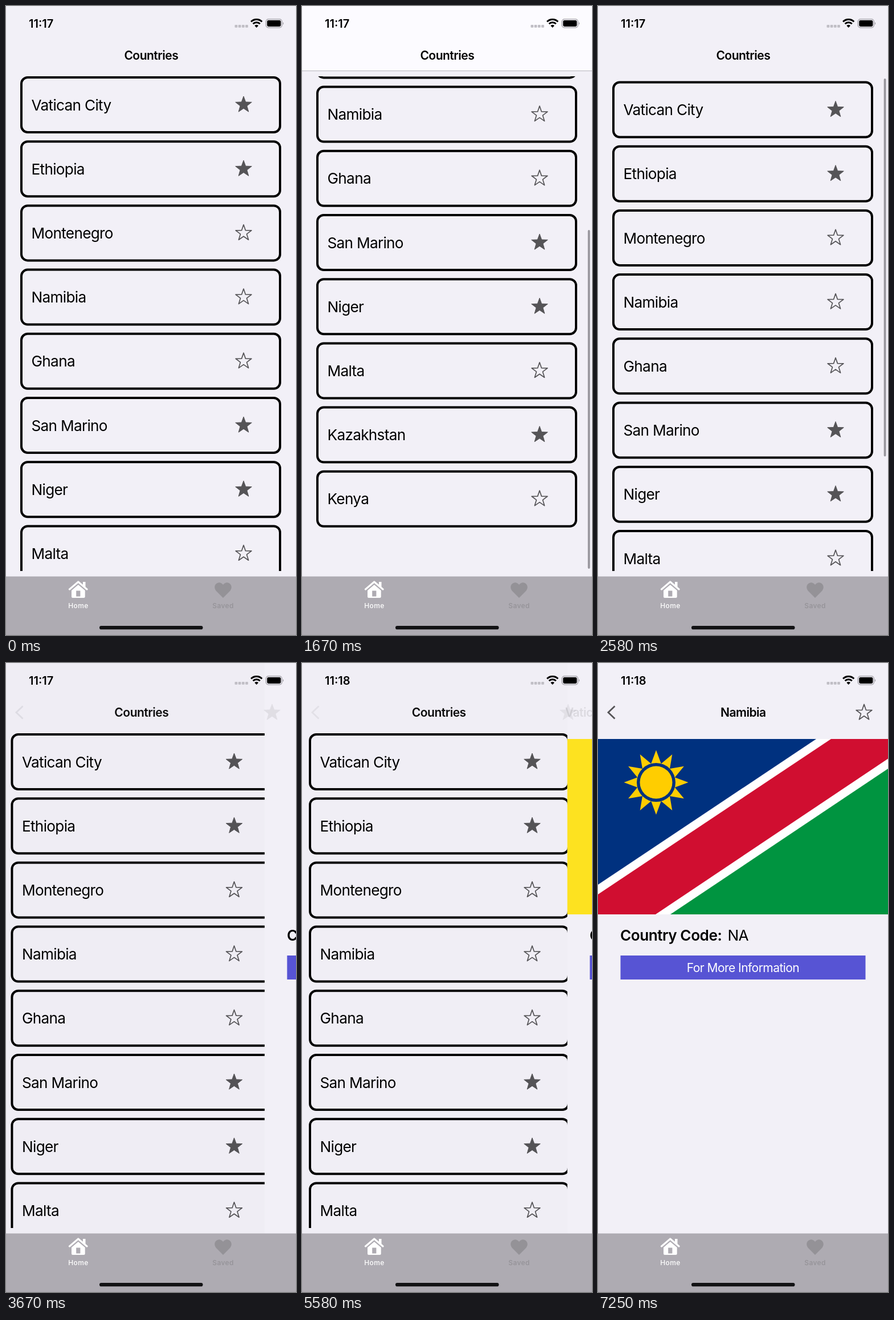
These frames come from a looping animation (509 by 1101 pixels, 8000 ms). An HTML page:

```html
<!DOCTYPE html>
<html lang="en">
<head>
<meta charset="utf-8">
<title>Countries</title>
<style>
  html, body { margin: 0; width: 100%; height: 100%; overflow: hidden; background: #f2f0f7; }
  svg { display: block; width: 100%; height: 100%; font-family: Inter, "Liberation Sans", sans-serif; }
  .label { font-size: 26.2px; letter-spacing: -.7px; }
  .strong { font-size: 26.2px; letter-spacing: -.5px; font-weight: 600; }
  .title { font-size: 21px; letter-spacing: -.5px; font-weight: 600; text-anchor: middle; }
  .button { font-size: 21px; letter-spacing: -.55px; text-anchor: middle; fill: #fff; }
  .clock { font-size: 20px; font-weight: 600; }
  .tab { font-size: 12px; letter-spacing: .4px; font-weight: 500; text-anchor: middle; }
  .emblem { stroke: #55503c; stroke-width: 1; }
</style>
</head>
<body>
<svg id="stage" viewBox="0 0 509 1101"></svg>
<script>
const WIDTH = 509, FPS = 12, LOOP = 8000;
const BG = '#f2f0f7', GREY = '#555457', YELLOW = '#fde220', SILVER = '#d3d3d5', RED = '#ee3135';
const MAX_SCROLL = 243, BAR_TOP = 127, BAR_BOTTOM = 985, BAR_LENGTH = 670;

const countries = ['Vatican City', 'Ethiopia', 'Montenegro', 'Namibia', 'Ghana',
  'San Marino', 'Niger', 'Malta', 'Kazakhstan', 'Kenya'];
const saved = new Set(['Vatican City', 'Ethiopia', 'San Marino', 'Niger', 'Kazakhstan']);

const clamp = v => Math.max(0, Math.min(1, v));

function starPoints(cx, cy, spikes, outer, inner) {
  return Array.from({ length: spikes * 2 }, (_, i) => {
    const r = i % 2 ? inner : outer, a = i * Math.PI / spikes;
    return `${(cx + r * Math.sin(a)).toFixed(2)},${(cy - r * Math.cos(a)).toFixed(2)}`;
  }).join(' ');
}

function star(cx, cy, filled) {
  return filled
    ? `<polygon points="${starPoints(cx, cy, 5, 15, 6.2)}" fill="${GREY}" stroke="${GREY}" stroke-linejoin="round"/>`
    : `<polygon points="${starPoints(cx, cy, 5, 14.6, 5.8)}" fill="none" stroke="${GREY}" stroke-width="1.7" stroke-linejoin="round"/>`;
}

const circle = (x, y, r, fill) => `<circle cx="${x}" cy="${y}" r="${r}" fill="${fill}"/>`;

function card(name, i) {
  return `<g transform="translate(0 ${i * 112.2})">
    <rect x="27" y="125" width="454" height="96" rx="11" fill="none" stroke="#000" stroke-width="4"/>
    <text class="label" x="44.5" y="182.7">${name}</text>
    ${star(417, 173, saved.has(name))}</g>`;
}

// Key with its bow at the lower left; mirrored for the second one.
function key(color) {
  const holes = [[-68, 325], [-52, 325], [-68, 341], [-52, 341]];
  return `<path d="M-44 320L70 222" stroke="#55503c" stroke-width="12"/>
    <path d="M-44 320L70 222" stroke="${color}" stroke-width="10"/>
    <path d="M44 246L63 229L72 237L79 230L86 238L85 248L76 254L70 248L65 254L70 260L62 270L47 257Z" fill="${color}"/>
    <path d="M64 224L74 213L81 211L82 218L71 231Z" fill="${color}"/>
    <path d="M-39 304L-30 297L-22 306L-32 315Z" fill="${color}"/>
    ${circle(-60, 333, 26.5, color)}${circle(-60, 333, 21, '#fff')}
    <path d="M-60 312V354M-81 333H-39" stroke="#55503c" stroke-width="6"/>
    <path d="M-60 312V354M-81 333H-39" stroke="${color}" stroke-width="4.5"/>
    ${holes.map(([x, y]) => circle(x, y, 9, '#fff')).join('')}
    ${circle(-60, 333, 3.5, color)}
    ${circle(83, 208, 3.5, YELLOW)}${circle(-82, 312, 3.5, YELLOW)}${circle(-82, 354, 3.5, YELLOW)}`;
}

function lappets() {
  const side = `
    <path d="M-26 216C-38 222-46 236-45 262L-32 266C-36 248-30 238-20 234Z" fill="#fff"/>
    <path d="M-18 235C-22 250-20 262-23 272L-11 276C-7 262-6 250-6 238Z" fill="#fff"/>
    <path d="M-29 218C-38 206-48 208-52 217L-61 209C-56 200-42 198-27 203Z" fill="${YELLOW}"/>
    <path d="M-39 239V252M-44 244H-34M-14 243V257M-18 248H-10" stroke="${YELLOW}" stroke-width="4"/>`;
  return side + `<g transform="scale(-1 1)">${side}</g>`;
}

function tiara() {
  const tiers = [[208, 27, 23], [187, 30, 21], [167, 22, 17]];
  return `<path d="M-17 170C-16 150 16 150 17 170Z" fill="#fff"/>
    <path d="M-24 190L-17 168H17L24 190L26 212L19 229H-19L-26 212Z" fill="${YELLOW}"/>` +
    tiers.map(([y, top, base]) =>
      `<path d="M${-top} ${y - 7}L${-top + 7} ${y - 2}L-8 ${y - 9}L0 ${y - 2}L8 ${y - 9}L${top - 7} ${y - 2}L${top} ${y - 7}L${base} ${y + 8}Q0 ${y + 14} ${-base} ${y + 8}Z" fill="${YELLOW}"/>
       <path d="M${-base} ${y + 3}Q0 ${y + 9} ${base} ${y + 3}" fill="none"/>
       ${[-14, 0, 14].map(x => circle(x, y + 2, 2.2, '#fff')).join('')}`).join('') +
    `<ellipse cx="0" cy="229" rx="19.5" ry="6" fill="${RED}"/>
     ${circle(0, 153, 3, YELLOW)}
     <path d="M0 150V139M-5 144H5" stroke="${YELLOW}" stroke-width="3"/>`;
}

function cord() {
  const beads = [[0, 274], [2, 280], [-12, 283], [11, 286], [-6, 288], [4, 289], [-12, 291], [0, 294],
    [6, 297], [-8, 300], [-10, 307], [-12, 313], [-15, 320], [2, 324], [3, 328], [-44, 344], [-37, 343],
    [-35, 350], [-30, 355], [30, 337], [35, 341], [43, 343], [43, 352], [32, 356], [17, 358], [10, 360], [2, 361]];
  const tassel = (x, y) => `<path d="M${x - 6} ${y + 20}V${y + 10}Q${x} ${y} ${x + 6} ${y + 10}V${y + 20}Q${x} ${y + 24} ${x - 6} ${y + 20}Z" fill="${RED}"/>
    ${circle(x, y + 2, 3, YELLOW)}${circle(x, y - 4, 2.5, YELLOW)}`;
  return beads.map(([x, y]) => `<ellipse cx="${x}" cy="${y}" rx="2.8" ry="2" fill="${RED}"/>`).join('') +
    tassel(4, 386) + tassel(-3, 391);
}

const vaticanFlag = `<rect y="133" width="254.5" height="307" fill="${YELLOW}"/>
  <rect x="254.5" y="133" width="254.5" height="307" fill="#fdfcff"/>
  <g class="emblem" transform="translate(378 0)">${lappets()}
    <g transform="scale(-1 1)">${key(SILVER)}</g>${key(YELLOW)}${tiara()}${cord()}</g>`;

const namibiaFlag = `<rect y="133" width="509" height="307" fill="#00317f"/>
  <path d="M127 440H509V133Z" fill="#009440"/>
  <path d="M509 185V440H127Z" fill="#009440"/>
  <path d="M383 133H509V185L127 440H0V388Z" fill="#fff"/>
  <path d="M409 133H509V167.500L101 440H0V405Z" fill="#d00e30"/>
  <polygon points="${starPoints(102, 209, 12, 56.5, 34)}" fill="#ffcd00"/>
  ${circle(102, 209, 34, '#00317f')}${circle(102, 209, 28.5, '#ffcd00')}`;

function detail(id, flag, code) {
  return `<g id="${id}"><rect width="509" height="1000" fill="${BG}"/>
    <g id="${id}Flag">${flag}</g>
    <text class="strong" x="39" y="485.5">Country Code:</text>
    <text class="label" x="227.500" y="485.5">${code}</text>
    <rect x="39.500" y="512" width="430" height="42" fill="#5754d4"/>
    <text class="button" x="254.500" y="540.5">For More Information</text></g>`;
}

const statusBar = `<text class="clock" id="clock" x="40" y="37.7"></text>
  ${[0, 1, 2, 3].map(i => `<rect x="${401.5 + i * 6.2}" y="33" width="4.800" height="4.800" rx="1" fill="#c0bec5"/>`).join('')}
  <g fill="none" stroke="#000" stroke-width="3">
    <path d="M430.1 27.500A13.500 13.500 0 0 1 449.300 27.500M433.600 31.200A8.600 8.600 0 0 1 445.800 31.200"/></g>
  <path d="M439.700 38L436.400 34.500A4.600 4.600 0 0 1 443 34.500Z"/>
  <rect x="456.300" y="23.200" width="28" height="14.600" rx="4" fill="none" stroke="#98969d" stroke-width="1.2"/>
  <rect x="458.200" y="25.100" width="24.200" height="10.800" rx="2.400"/>
  <path d="M486 28Q488.500 30.500 486 33Z" fill="#98969d"/>`;

const tabBar = `<rect y="998.5" width="509" height="103" fill="#aeabb2"/>
  <g fill="#fff">
    <path d="M111.500 1021L126.800 1008L142 1021" fill="none" stroke="#fff" stroke-width="3.2" stroke-linecap="round" stroke-linejoin="round"/>
    <rect x="135" y="1008" width="4.500" height="9"/>
    <path d="M115 1023L126.800 1013L138.700 1023V1034Q138.700 1036 136.700 1036H117Q115 1036 115 1034Z"/>
    <rect x="123.200" y="1023.500" width="7.200" height="10" fill="#aeabb2"/>
    <text class="tab" x="127" y="1054.3">Home</text></g>
  <g fill="#949297">
    <path d="M381 1036L368.500 1023.500C362 1015 371 1005 379 1011L381 1013L383 1011C391 1005 400 1015 393.500 1023.500Z"/>
    <text class="tab" x="381" y="1054.3">Saved</text></g>
  <rect x="164" y="1085" width="181.500" height="6.300" rx="3.100" fill="#121214"/>`;

document.getElementById('stage').innerHTML = `
  <clipPath id="viewport"><rect y="123" width="509" height="866"/></clipPath>
  <rect width="509" height="1101" fill="${BG}"/>
  <g id="list">
    <g clip-path="url(#viewport)"><g id="cards">${countries.map(card).join('')}</g></g>
    <g id="navBar"><rect width="509" height="113.500" fill="#fcfbff"/>
      <rect y="113" width="509" height="1" fill="#b9b8bd"/></g>
    <rect id="scrollBar" x="501.700" width="3.800" rx="1.900" fill="#98969d"/>
  </g>
  <rect id="dim" width="509" height="1000"/>
  ${detail('vatican', vaticanFlag, 'VA')}
  ${detail('namibia', namibiaFlag, 'NA')}
  <text class="title" id="listTitle" x="254.800" y="94">Countries</text>
  <text class="title" id="detailTitle" y="94" x="254.800"></text>
  <g id="controls">
    <path d="M29.500 75.500L18 86.500L29.500 97.500" fill="none" stroke="${GREY}" stroke-width="2.800"/>
    <g id="starOn">${star(467, 87, true)}</g><g id="starOff">${star(467, 87, false)}</g>
  </g>
  ${statusBar}${tabBar}`;

const el = Object.fromEntries([...document.querySelectorAll('[id]')].map(node => [node.id, node]));
const set = (node, attrs) => Object.entries(attrs).forEach(([k, v]) => node.setAttribute(k, v));
const show = (node, visible) => { node.style.display = visible ? '' : 'none'; };

// Critically damped spring, n in frames since the start.
function spring(n) {
  const x = .93 * n;
  return x > 7.5 ? 1 : 1 - (1 + x) * Math.exp(-x);
}

const returnDrag = [320, 305, 262, 200, 130, 65, 0, -30, -17, -8.5, -4, -2, -1, 0];

function scrollAt(frame) {
  if (frame < 22) {
    const p = clamp((frame - 14) / 6);
    return 320 * p * p * (3 - 2 * p);
  }
  return returnDrag[frame - 22] ?? 0;
}

function drawList(frame) {
  const y = scrollAt(frame);
  const over = Math.max(0, -y, y - MAX_SCROLL);
  const length = BAR_LENGTH - over;
  const travel = BAR_BOTTOM - BAR_TOP - length;
  set(el.cards, { transform: `translate(0 ${-y})` });
  set(el.navBar, { opacity: clamp(y / 12) });
  set(el.scrollBar, {
    y: BAR_TOP + clamp(y / MAX_SCROLL) * travel,
    height: length,
    opacity: frame < 15 ? 0 : clamp((35 - frame) / 3)
  });
}

function drawNavigation(frame) {
  const onNamibia = frame >= 79;
  const step = frame - (onNamibia ? 79 : 44);
  let p = 0;
  if (onNamibia) p = spring(step + 1.03);
  else if (frame >= 63) p = 1 - spring(frame - 63 + .4);
  else if (frame >= 44) p = spring(step + .6);

  const page = onNamibia ? el.namibia : el.vatican;
  show(el.vatican, p > 0 && !onNamibia);
  show(el.namibia, p > 0 && onNamibia);
  set(page, { transform: `translate(${WIDTH * (1 - p)} 0)` });
  show(onNamibia ? el.namibiaFlag : el.vaticanFlag, step >= 2);
  set(el.list, { transform: `translate(${-.3 * WIDTH * p} 0)` });
  set(el.dim, { opacity: .1 * p });

  set(el.listTitle, { transform: `translate(${-71.7 * p ** .647} 0)`, opacity: 1 - p ** 1.3 });
  el.detailTitle.textContent = onNamibia ? 'Namibia' : 'Vatican City';
  set(el.detailTitle, { transform: `translate(${290 * (1 - p)} 0)`, opacity: step >= 1 ? p : 0 });
  set(el.controls, { opacity: p });
  show(el.starOn, !onNamibia);
  show(el.starOff, onNamibia);
}

function draw(now) {
  const frame = Math.floor((now % LOOP + 4) * FPS / 1000) % (LOOP * FPS / 1000);
  el.clock.textContent = frame < 63 ? '11:17' : '11:18';
  drawList(frame);
  drawNavigation(frame);
}

const start = performance.now();
function tick() {
  draw(performance.now() - start);
  requestAnimationFrame(tick);
}
tick();
</script>
</body>
</html>
```
